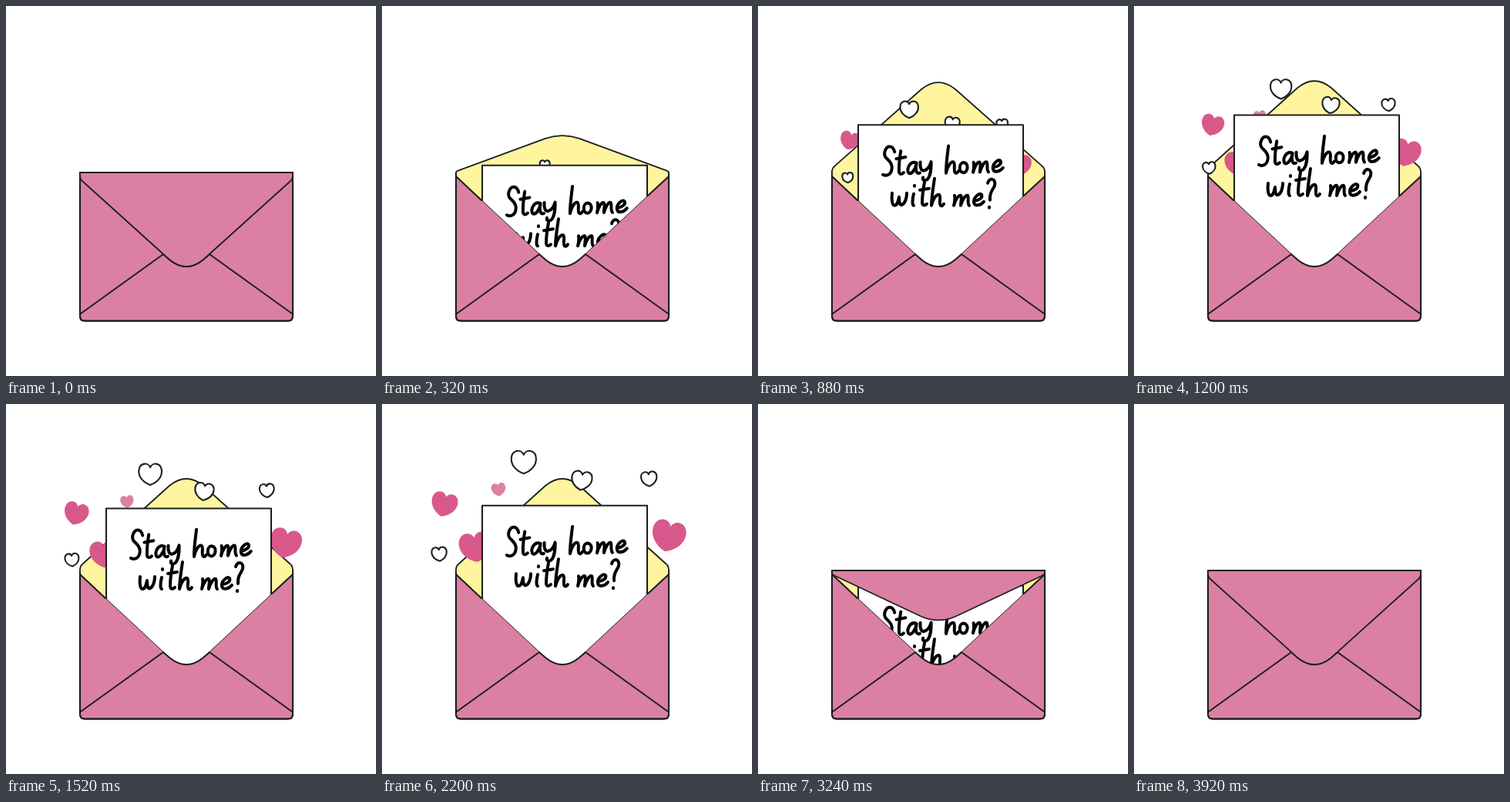
These frames come from a looping animation (480x480 px, 4.04 s). An HTML page with a canvas:

```html
<!DOCTYPE html>
<html lang="en">
<head>
<meta charset="utf-8">
<title>Envelope</title>
<style>
  html, body { margin: 0; width: 100%; height: 100%; overflow: hidden; background: #fff; }
  canvas { display: block; width: 100vmin; height: 100vmin; }
</style>
</head>
<body>
<canvas id="stage" width="480" height="480" role="img" aria-label="Stay home with me?"></canvas>
<script>
const ctx = document.getElementById('stage').getContext('2d');
const LOOP = 4040, STEP = 40, CLOSE_AT = 2970;
const INK = '#1d1f21', PINK = '#db80a3', ROSE = '#d9588b', YELLOW = '#fff59f', WHITE = '#fff';
const HINGE = 217.5;

// Hand lettering: [advance, strokes], origin at the baseline.
const GLYPHS = {
  S: [18, 'M17-29C15-38 7-39 4-29C2-20 12-20 13-10C13 0 6 3 1 0'],
  t: [15, 'M1-20L13-22M7-30C5-20 4-8 4-3C5 1 8 0 10-2'],
  a: [16, 'M12-14C4-18-1-7 1-2C4 3 11-6 12-14C10-6 11 1 16-1'],
  y: [22, 'M1-15C0-8 2-3 6-4C11-5 14-12 15-15C15-5 13 5 9 8C5 10 3 8 4 5'],
  h: [18, 'M5-35C3-22 1-10 1 0C3-8 7-15 11-14C14-12 10-2 13 0C14 1 16 0 17-2'],
  o: [17, 'M6-13C0-13-1-1 5 0C11 1 14-12 6-13Z'],
  m: [26, 'M2-13C3-8 2-4 1 0C3-7 7-14 10-13C12-11 10-5 10 0C12-7 16-14 19-13C21-11 18-3 21 0'],
  e: [17, 'M1-6C7-6 13-10 11-14C8-17 0-10 1-4C2 2 10 0 14-5'],
  w: [26, 'M1-16C0-8 1 0 4 0C8 0 9-7 10-11C10-4 11 0 14-1C18-3 20-10 20-16'],
  i: [10, 'M3-15C1-8 1 0 3 0M4-25L4-26'],
  '?': [14, 'M2-29C4-37 13-35 11-26C9-20 4-18 5-7M4 2L4 3'],
  ' ': [11, '']
};
for (const glyph of Object.values(GLYPHS)) glyph[1] = new Path2D(glyph[1]);

const HEART = new Path2D('M0 .46C-.3 .36-.5 .12-.5-.13C-.5-.5-.1-.56 0-.3C.1-.56 .5-.5 .5-.13C.5 .12 .3 .36 0 .46Z');
// Resting place, offset back to the start, width, tilt, fill.
const HEARTS = [
  { x: 182.6, y: 69.5, dx: 34.5, dy: 165, w: 35, tilt: 0, fill: WHITE },
  { x: 259.7, y: 94, dx: -20, dy: 150, w: 29, tilt: 8, fill: WHITE },
  { x: 349.5, y: 91.5, dx: -83, dy: 158, w: 23, tilt: -5, fill: WHITE },
  { x: 70, y: 192, dx: 118, dy: 78, w: 22, tilt: -5, fill: WHITE },
  { x: 76.5, y: 126, dx: 108, dy: 124, w: 35, tilt: 15, fill: ROSE },
  { x: 118.5, y: 182.5, dx: 76, dy: 95, w: 43, tilt: -8, fill: ROSE },
  { x: 375, y: 168, dx: -95, dy: 98, w: 45, tilt: 13, fill: ROSE },
  { x: 149, y: 105, dx: 62, dy: 164, w: 19, tilt: -8, fill: PINK },
  { x: 309, y: 135, dx: -40, dy: 120, w: 18, tilt: 0, fill: PINK }
];

const BODY = new Path2D('M96 216H372V402Q372 408.4 366 408.4H102Q96 408.4 96 402Z');
const POCKET = new Path2D('M96 221L212 329Q234 347 256 329L372 221V402Q372 408.4 366 408.4H102Q96 408.4 96 402Z');
const MOUTH = new Path2D('M96 221L212 329Q234 347 256 329L372 221');
const SEAMS = new Path2D('M204 322L97 399M264 322L371 399M96 221L129 252M372 221L345 246M204 322L212 329Q234 347 256 329L264 322');
const SIDES = new Path2D('M96 221V402Q96 408.4 102 408.4H366Q372 408.4 372 402V221');

// Critically damped approach from 0 to 1.
function settle(time, tau) {
  const x = Math.max(0, time) / tau;
  return 1 - (1 + x) * Math.exp(-x);
}

function stroke(path, width = 2.1) {
  ctx.strokeStyle = INK;
  ctx.lineWidth = width;
  ctx.stroke(path);
}

function fill(path, color) {
  ctx.fillStyle = color;
  ctx.fill(path);
}

// scale: 1 is folded down, -1 is fully open.
function drawFlap(scale) {
  const y = value => HINGE + (value - HINGE) * scale;
  const flap = new Path2D();
  flap.moveTo(96, y(216));
  flap.lineTo(96, y(220));
  flap.quadraticCurveTo(96, y(225), 100, y(228));
  flap.lineTo(212, y(329));
  flap.quadraticCurveTo(234, y(347), 256, y(329));
  flap.lineTo(368, y(228));
  flap.quadraticCurveTo(372, y(225), 372, y(220));
  flap.lineTo(372, y(216));
  fill(flap, scale > 0 ? PINK : YELLOW);
  stroke(flap, 1.8);
  if (scale > 0) stroke(new Path2D('M96 216H372'));
}

function drawHeart(heart, out) {
  const back = 1 - out;
  const size = heart.w * (1 - 0.69 * back);
  const outlined = heart.fill === WHITE;
  const width = outlined ? size - 2 : size;
  ctx.save();
  ctx.translate(heart.x + heart.dx * back, heart.y + heart.dy * back);
  ctx.rotate(heart.tilt * Math.PI / 180);
  ctx.scale(width, width);
  fill(HEART, heart.fill);
  if (outlined) stroke(HEART, 2.1 / width);
  ctx.restore();
}

function write(text, x, y, angle) {
  ctx.save();
  ctx.translate(x, y);
  ctx.rotate(angle);
  ctx.strokeStyle = '#000';
  ctx.lineWidth = 4;
  for (const char of text) {
    const [advance, path] = GLYPHS[char];
    ctx.stroke(path);
    ctx.translate(advance, 0);
  }
  ctx.restore();
}

function drawCard(top) {
  const card = new Path2D();
  card.rect(130, top, 214, 400 - top);
  fill(card, WHITE);
  stroke(card);
  write('Stay home', 161, top + 64.5, -0.025);
  write('with me?', 173, top + 104.5, 0);
}

function draw(time) {
  const flapOpen = settle(time, 130) * (1 - settle(time - CLOSE_AT, 98));
  const keep = 1 - settle(time - CLOSE_AT, 35);
  const cardTop = 236 - 105 * settle(time, 308) * keep;
  const heartsOut = settle(time, 430) * keep;
  const flapScale = 1 - 2 * flapOpen;

  ctx.fillStyle = WHITE;
  ctx.fillRect(0, 0, 480, 480);
  ctx.lineCap = ctx.lineJoin = 'round';

  fill(BODY, YELLOW);
  stroke(BODY);
  if (flapScale <= 0) drawFlap(flapScale);
  for (const heart of HEARTS) drawHeart(heart, heartsOut);
  drawCard(cardTop);
  fill(POCKET, PINK);
  stroke(MOUTH, 1);
  stroke(SEAMS);
  stroke(SIDES);
  if (flapScale > 0) drawFlap(flapScale);
}

const start = performance.now();
function tick() {
  const time = (performance.now() - start) % LOOP;
  draw(Math.floor(time / STEP) * STEP);
  requestAnimationFrame(tick);
}
tick();
</script>
</body>
</html>
```
